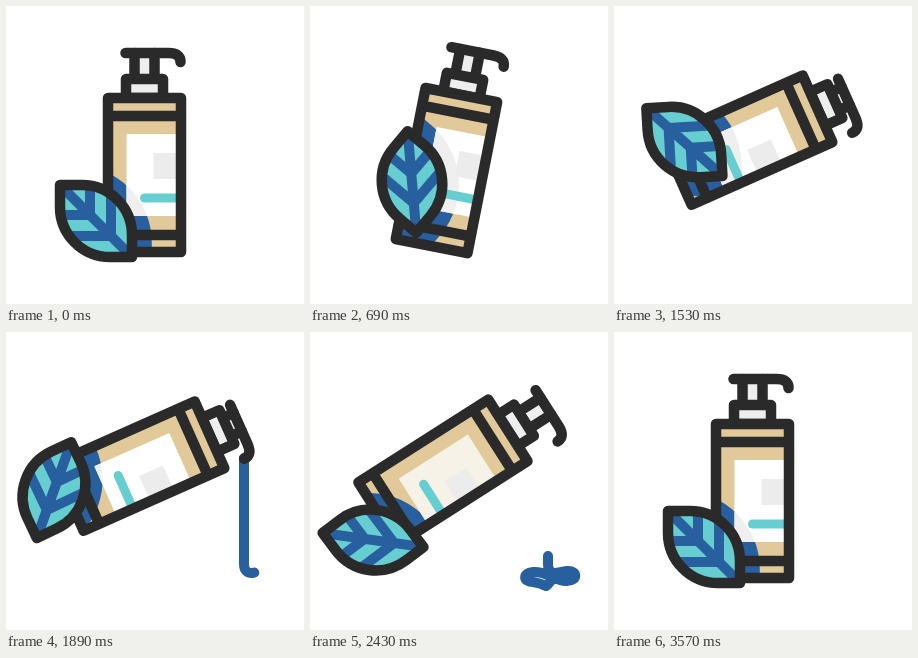
An HTML page that plays this animation: 298x298 px, repeating every 3600 ms.

```html
<!DOCTYPE html>
<html lang="en">
<head>
<meta charset="utf-8">
<title>Pump bottle and leaf</title>
<style>
html, body { margin: 0; width: 100%; height: 100%; overflow: hidden; background: #fff; }
svg { display: block; width: 100vw; height: 100vh; }
.ink { fill: none; stroke: #2a2a2a; stroke-width: 10.5; stroke-linecap: round; stroke-linejoin: round; }
.ink.pale { fill: #eeeeef; }
.blue { fill: none; stroke: #285f9e; stroke-width: 10; stroke-linecap: round; stroke-linejoin: round; }
</style>
</head>
<body>
<svg viewBox="0 0 298 298">
  <defs>
    <path id="blade" d="M-36-36h22a50 50 0 0 1 50 50v22h-22a50 50 0 0 1-50-50z"/>
    <clipPath id="inBlade"><use href="#blade"/></clipPath>
    <clipPath id="inBody"><rect x="-36.5" y="-77" width="73" height="154"/></clipPath>
    <clipPath id="inLabel"><rect x="-18" y="-41" width="54" height="82"/></clipPath>
  </defs>

  <path id="stream" class="blue" d="M238 126V232Q238 241 246 241L257 239C268 238 268 249 257 249C245 250 238 239 223 240C212 241 213 250 223 250Q230 251 236 254C240 252 240 246 248 244"/>

  <g id="bottle">
    <g id="pump">
      <path class="ink pale" d="M-10-122V-92H10V-122"/>
      <path class="ink" d="M-19-122H24Q36-122 36-113"/>
    </g>
    <rect class="ink pale" x="-18.5" y="-96" width="37" height="19"/>
    <rect x="-36.5" y="-77" width="73" height="154" fill="#e1c999"/>
    <g clip-path="url(#inBody)"><use class="shade" href="#blade" fill="#285f9e"/></g>
    <rect id="label" x="-18" y="-41" width="54" height="82" fill="#fff"/>
    <g clip-path="url(#inLabel)"><use class="shade" href="#blade" fill="#efefef"/></g>
    <rect x="9" y="-22" width="27" height="26" fill="#ececec"/>
    <path d="M0 23H34" stroke="#66cdd0" stroke-width="9" stroke-linecap="round"/>
    <path class="ink" d="M-36.5-77H36.5V77H-36.5zM-36.5-59H36.5M-36.5 60H36.5"/>
  </g>

  <g id="leaf">
    <use href="#blade" fill="#66cdd0"/>
    <path class="blue" clip-path="url(#inBlade)" d="M-36-36L36 36M-6-40V-6H-40M15-40V15H-40"/>
    <use href="#blade" class="ink"/>
  </g>
</svg>
<script>
const LOOP = 3600;
const $ = id => document.getElementById(id);
const stream = $('stream'), len = stream.getTotalLength();
const shades = document.querySelectorAll('.shade');

const ramp = (t, from, to) => Math.min(1, Math.max(0, (t - from) / (to - from)));
const ease = (t, from, to) => {
  const p = ramp(t, from, to);
  return p < 0.5 ? 4 * p ** 3 : 1 - 4 * (1 - p) ** 3;
};
// Rises to 1 over a..b, falls back to 0 over c..d
const there = (f, t, a, b, c, d) => f(t, a, b) - f(t, c, d);

// Leaf poses: time, x, y, turn
const poses = [
  [0, 90, 215, 0], [300, 90, 215, 0], [690, 102, 176, 40], [1560, 69, 136, 177],
  [1890, 48, 158, 65], [2130, 46, 184, -3], [2430, 63, 208, -37],
  [2850, 86, 218, -4], [3300, 90, 215, 0], [LOOP, 90, 215, 0]
];

// Smooth curve through the poses that never overshoots one
function pose(t, c) {
  const i = Math.max(0, poses.findIndex(p => p[0] > t) - 1);
  const slope = k => poses[k] && poses[k + 1]
    ? (poses[k + 1][c] - poses[k][c]) / (poses[k + 1][0] - poses[k][0]) : 0;
  const tangent = k => {
    const a = slope(k - 1), b = slope(k);
    return a * b > 0 ? 2 * a * b / (a + b) : 0;
  };
  const p = poses[i], q = poses[i + 1];
  const d = q[0] - p[0], u = (t - p[0]) / d, v = 1 - u;
  return p[c] * v * v * (1 + 2 * u) + q[c] * u * u * (3 - 2 * u)
    + d * u * v * (tangent(i) * v - tangent(i + 1) * u);
}

function draw(t) {
  const a = 66 * there(ease, t, 275, 1470, 1994, 3366);
  const x = 138.5 - 0.2 * a + 0.0018 * a * a;
  const y = 169 - 0.37 * a - 0.0024 * a * a;
  const leaf = `translate(${pose(t, 1)} ${pose(t, 2)}) rotate(${pose(t, 3)})`;
  $('bottle').setAttribute('transform', `translate(${x} ${y}) rotate(${a})`);
  $('pump').setAttribute('transform', `translate(0 ${14 * there(ease, t, 1370, 1500, 2020, 2220)})`);
  $('leaf').setAttribute('transform', leaf);
  for (const s of shades) {
    s.setAttribute('transform', `rotate(${-a}) translate(${-x} ${-y}) ${leaf} scale(1.55)`);
  }

  const warm = there(ramp, t, 2300, 2400, 2460, 2560);
  $('label').setAttribute('fill', `rgb(${255 - 8 * warm},${255 - 13 * warm},${255 - 23 * warm})`);

  const tail = len * ramp(t, 2250, 2690);
  const size = len * ramp(t, 1640, 2130) - tail;
  stream.style.display = size > 0.5 ? '' : 'none';
  stream.style.strokeDasharray = `${size} ${2 * len}`;
  stream.style.strokeDashoffset = -tail;
}

const start = performance.now();
function tick() {
  draw((performance.now() - start) % LOOP);
  requestAnimationFrame(tick);
}
tick();
</script>
</body>
</html>
```
